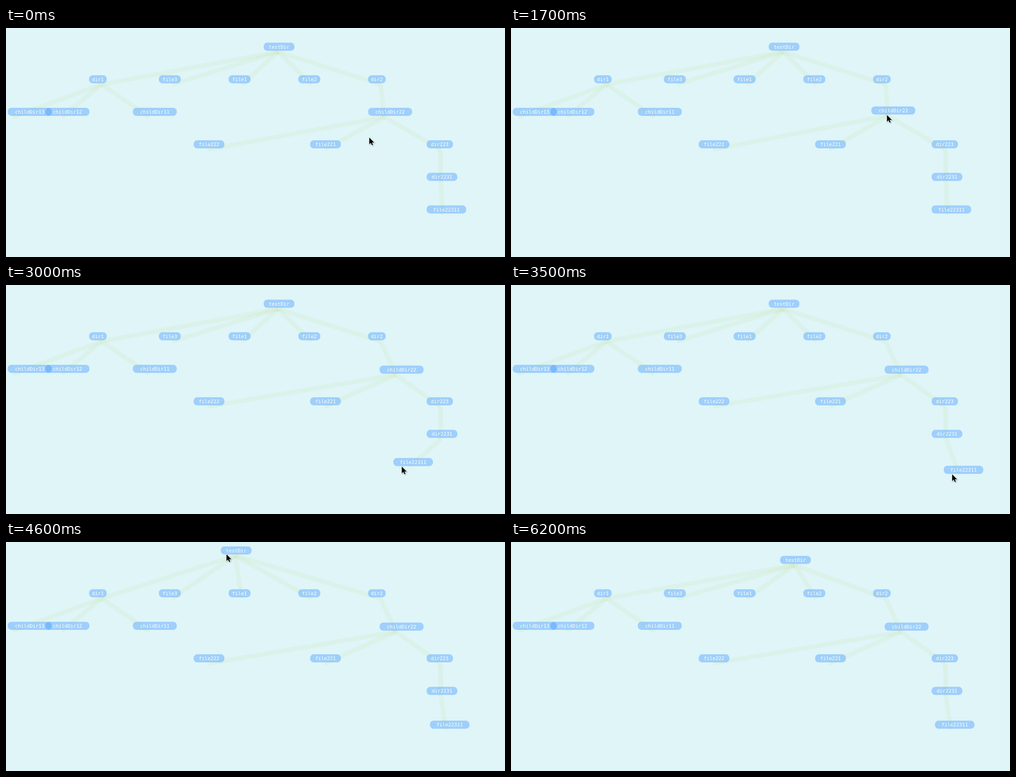
These frames come from a looping animation (1101 px wide and 508 px high, 7.1 s). An HTML page with a canvas:

```html
<!DOCTYPE html>
<html lang="en">
<head>
<meta charset="utf-8">
<title>Draggable tree</title>
<style>
  html, body { margin: 0; width: 100%; height: 100%; overflow: hidden; background: #dff5f8; }
  canvas { display: block; }
</style>
</head>
<body>
<canvas id="stage" width="1101" height="508"></canvas>
<script>
const ctx = document.getElementById('stage').getContext('2d');
const LOOP = 7100, STEP = 100;
const TOP = 41.5, ROW_H = 72.2;
const PILL_H = 18, CHAR_W = 9.7, MIN_X = 3.8, ANCHOR_Y = 11.5;

const nodes = [];
function add(parent, x, ...labels) {
  const depth = parent ? parent.depth + 1 : 0;
  const added = labels.map((label, i) => {
    const w = label.length * CHAR_W;
    return { label, parent, depth, w, x: x(i), y: TOP + ROW_H * depth };
  });
  nodes.push(...added);
  return added;
}

const [root] = add(null, () => 568.5, 'testDir');
const [dir1, , , , dir2] = add(root, i => 183.3 + 153.9 * i, 'dir1', 'file3', 'file1', 'file2', 'dir2');
add(dir1, i => [-21, 87, 279.8][i], 'childDir13', 'childDir12', 'childDir11');
const [child] = add(dir2, () => 799, 'childDir22');
const [, , dir3] = add(child, i => 414 + 257 * i, 'file222', 'file221', 'dir223');
const [dir4] = add(dir3, () => dir3.x, 'dir2231');
const [leaf] = add(dir4, () => dir3.x, 'file22311');

// Path points are [time, left edge, vertical centre]; grab is the pointer's offset from them.
const drags = [
  { node: child, grab: [35, 10], rest: [1800, 824.3, 187.8],
    path: [[800, child.x, child.y], [1200, 672, 171], [1500, 870, 178], [1700, 795, 183]] },
  { node: leaf, grab: [19, 10], rest: [3600, 935.4, 405.3],
    path: [[2650, leaf.x, leaf.y], [2900, 838, 388], [3300, 952, 420], [3500, 954.8, 410]] },
  { node: root, grab: [13, 8.5],
    path: [[4200, root.x, root.y], [4650, 471, 18]] },
  { node: root, grab: [51, 10], rest: [5700, 593.7, 39.8],
    path: [[4750, 471, 18], [5300, 543.7, 38], [5500, 621, 49]] }
];

// Pointer stops between the drags: [time, x, y]
const stops = [
  [100, 802, 243], [300, 899, 222], [500, 850, 191], [700, 850, 191],
  [2100, 1033, 320], [2300, 995, 382], [2400, 986, 388], [2500, 986, 388], [2600, 958, 405],
  [3700, 724, 78], [4000, 644, 52], [4100, 612, 45], [6100, 267, 1]
];
const held = drags.flatMap(({ grab, path }) =>
  path.map(([t, x, y]) => [t, x + grab[0], y + grab[1]]));
const pointer = [...stops, ...held].sort((a, b) => a[0] - b[0]);
const pointerGone = t => t >= 6200 || (t >= 3800 && t < 4000);

for (const { node, path, rest } of drags) {
  node.track = [...(node.track || []), ...path, ...(rest ? [rest] : [])];
}

const ease = p => (1 - Math.cos(Math.PI * p)) / 2;

function at(track, t) {
  const i = track.findIndex(k => k[0] > t);
  if (i === 0) return track[0].slice(1);
  if (i < 0) return track[track.length - 1].slice(1);
  const a = track[i - 1], b = track[i];
  const p = ease((t - a[0]) / (b[0] - a[0]));
  return [1, 2].map(j => a[j] + (b[j] - a[j]) * p);
}

const anchor = n => [n.x + 22 + 0.145 * n.w, n.y + ANCHOR_Y];

function drawLink(n) {
  ctx.beginPath();
  ctx.moveTo(...anchor(n.parent));
  ctx.lineTo(...anchor(n));
  ctx.stroke();
}

function drawPill(n, tip) {
  const x = Math.max(MIN_X, n.x);
  const hover = tip && tip[0] > x && tip[0] < x + n.w && Math.abs(tip[1] - n.y) < 8;
  ctx.fillStyle = hover ? '#4096ff' : 'rgba(64,150,255,.4)';
  ctx.beginPath();
  ctx.roundRect(x, n.y - PILL_H / 2, n.w, PILL_H, 8);
  ctx.fill();
  ctx.fillStyle = '#fff';
  ctx.fillText(n.label, x + n.w / 2, n.y + 4);
}

const arrow = new Path2D('M0 0V15L3.5 11.8L5.8 17L8.2 16L6 11H10.8Z');
function drawPointer(x, y) {
  ctx.save();
  ctx.translate(x - 0.5, y);
  ctx.shadowColor = 'rgba(0,0,0,.35)';
  ctx.shadowBlur = 2;
  ctx.shadowOffsetX = ctx.shadowOffsetY = 1;
  ctx.strokeStyle = '#fff';
  ctx.lineWidth = 1.5;
  ctx.stroke(arrow);
  ctx.shadowColor = 'transparent';
  ctx.fillStyle = '#000';
  ctx.fill(arrow);
  ctx.restore();
}

function render(t) {
  ctx.fillStyle = '#dff5f8';
  ctx.fillRect(0, 0, 1101, 508);

  for (const n of nodes) if (n.track) [n.x, n.y] = at(n.track, t);
  const tip = pointerGone(t) ? null : at(pointer, t);

  ctx.strokeStyle = 'rgba(170,205,80,.085)';
  ctx.lineWidth = 10;
  for (const n of nodes) if (n.parent) drawLink(n);

  ctx.font = '10.8px "DejaVu Sans Mono", monospace';
  ctx.textAlign = 'center';
  for (const n of nodes) drawPill(n, tip);
  if (tip) drawPointer(...tip);
}

const start = performance.now();
function tick() {
  const t = (performance.now() - start) % LOOP;
  render(Math.floor(t / STEP) * STEP);
  requestAnimationFrame(tick);
}
tick();
</script>
</body>
</html>
```
